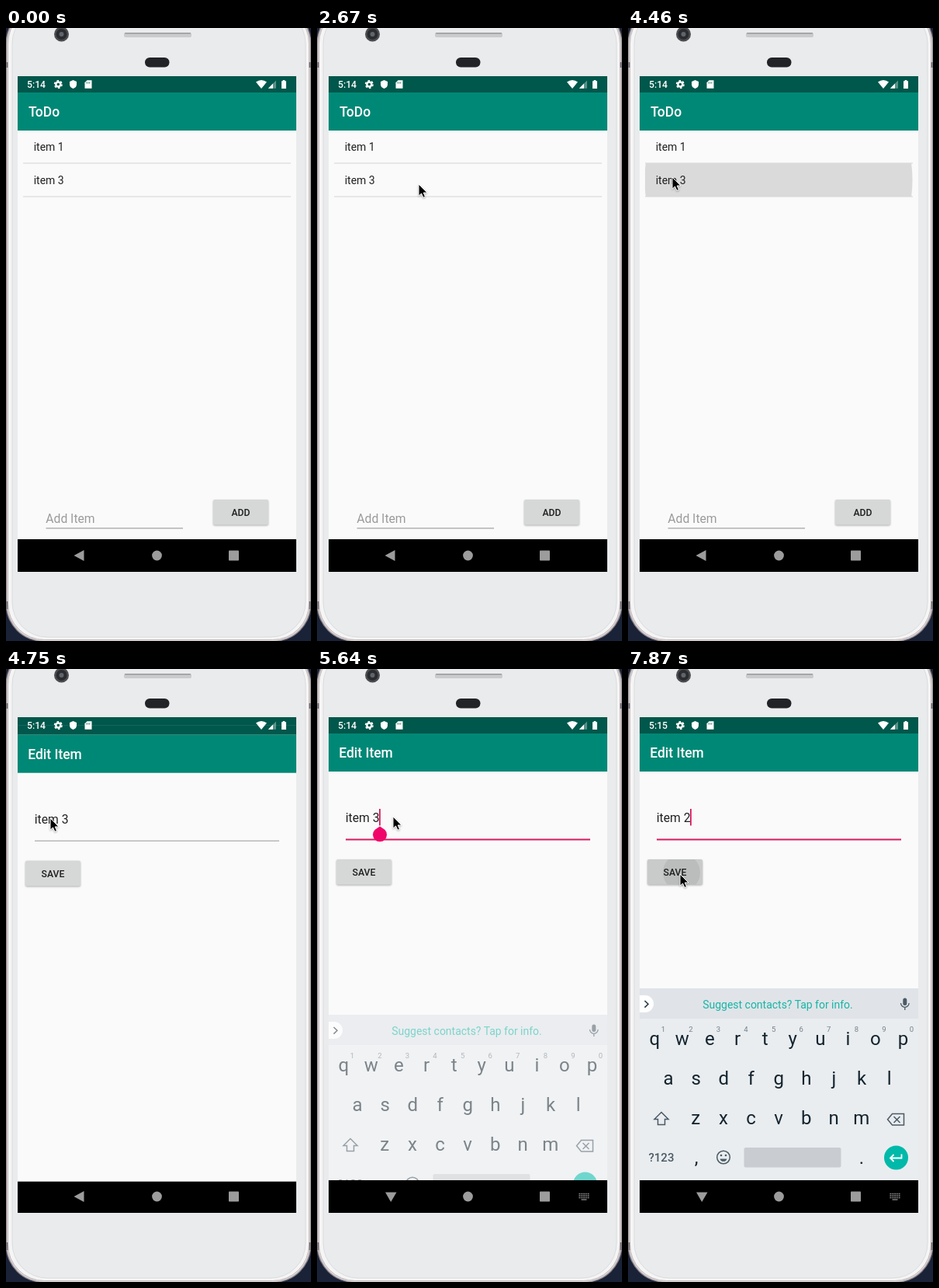
These frames come from a looping animation (393 px wide and 789 px high, 8 s). An HTML page:

```html
<!DOCTYPE html>
<html lang="en">
<head>
<meta charset="utf-8">
<title>ToDo</title>
<style>
  html, body { margin: 0; width: 100%; height: 100%; overflow: hidden; background: #1a2238; }
  svg { display: block; width: 100vw; height: 100vh; }
  text { font-family: Roboto, sans-serif; white-space: pre; }
  .title { font-size: 17.46px; font-weight: 500; fill: #fff; }
  .item { font-size: 13.97px; fill: #212121; }
  .field { font-size: 15.7px; fill: #212121; }
  .label { font-size: 12.2px; font-weight: 500; fill: #1f1f1f; text-anchor: middle; }
  .key { font-size: 24px; fill: #14242e; text-anchor: middle; }
  .num { font-size: 9.5px; fill: #75818a; text-anchor: middle; }
  .line { fill: none; stroke: #4b5a64; stroke-width: 1.5; }
  .shadow { filter: drop-shadow(0 1px 1px rgba(0,0,0,.3)); }
</style>
</head>
<body>
<svg viewBox="0 0 393 789" preserveAspectRatio="none">
  <defs>
    <clipPath id="screenClip"><rect x="15" y="62" width="359" height="638"/></clipPath>
    <clipPath id="rowClip"><rect x="22" y="174" width="345" height="43"/></clipPath>
    <clipPath id="revealClip"><rect id="reveal" x="15" y="62" width="359" height="638"/></clipPath>
    <clipPath id="keysClip"><rect x="15" y="132" width="359" height="526"/></clipPath>
    <clipPath id="saveClip"><rect x="25" y="245" width="71" height="32.5" rx="2"/></clipPath>
  </defs>

  <g id="phone">
    <rect x="-.5" y="-29" width="394" height="819" rx="49" fill="#8f888c"/>
    <rect x="1" y="-28" width="391" height="817" rx="48" fill="#ddd5d7"/>
    <rect x="2.5" y="-27" width="388" height="814.5" rx="47" fill="#f6f5f5" stroke="#b4acaf" stroke-width=".8"/>
    <rect x="8" y="-25" width="378" height="809" rx="45" fill="#e9ebec" stroke="#d5d6d8" stroke-width=".8"/>
    <path d="M0 44h2.5v7H0zM390.500 44h2.500v7h-2.500zM0 738h2.500v10H0zM390.500 738h2.500v10h-2.500z" fill="#77727a"/>
    <rect x="152" y="6" width="87" height="6" rx="2" fill="#c9cbcd"/>
    <rect x="153" y="6" width="85" height="1.500" rx=".7" fill="#97999c"/>
    <circle cx="71.500" cy="8" r="9.500" fill="#4b4d50"/>
    <circle cx="71.500" cy="8" r="7" fill="#2a2c30"/>
    <circle cx="71.500" cy="8" r="3" fill="#60656c"/>
    <rect x="179" y="38" width="31.500" height="12.500" rx="6.200" fill="#222326"/>
  </g>

  <g clip-path="url(#screenClip)">
    <rect x="15" y="62" width="359" height="638" fill="#fafafa"/>
    <rect x="15" y="62" width="359" height="21" fill="#00574b"/>
    <g id="list">
      <rect x="15" y="83" width="359" height="49" fill="#008876"/>
      <text class="title" x="29" y="114">ToDo</text>
      <path d="M22 174H367M22 217H367" stroke="#e1e1e1" stroke-width="1.600"/>
      <g clip-path="url(#rowClip)"><circle id="rowRipple" cy="195.500"/></g>
      <text class="item" x="35.700" y="158">item 1</text>
      <text class="item" x="35.700" y="201">item 3</text>
      <text class="field" x="51.300" y="637" style="fill:#9b9b9b">Add Item</text>
      <path d="M51.500 643.800H228" stroke="#a3a3a3" stroke-width="1.300"/>
      <rect class="shadow" x="267" y="607" width="71" height="32.500" rx="2" fill="#d6d7d7"/>
      <text class="label" x="302.500" y="628">ADD</text>
    </g>
    <rect x="15" y="658" width="359" height="42" fill="#000"/>

    <g id="edit" clip-path="url(#revealClip)">
      <g id="editBody">
        <rect x="15" y="62" width="359" height="596" fill="#fafafa"/>
        <rect x="15" y="62" width="359" height="21" fill="#00574b"/>
        <rect x="15" y="83" width="359" height="49" fill="#008876"/>
        <text class="title" x="28.300" y="114">Edit Item</text>
        <text id="entry" class="field" x="36.800" y="197"></text>
        <path id="underline" d="M37 219.500H352"/>
        <rect id="caret" x="80" y="180" width="1.800" height="21.500" fill="#d81b60"/>
        <path id="handle" d="M81 202.500L87.500 207A9 9 0 1 1 74.500 207Z" fill="#f0066a"/>
        <rect class="shadow" id="save" x="25" y="245" width="71" height="32.500" rx="2"/>
        <g clip-path="url(#saveClip)"><circle id="saveRipple" cx="69" cy="262" fill="#bbbdbd"/></g>
        <text class="label" x="60.500" y="266">SAVE</text>
      </g>
      <rect id="seam" x="15" width="359" height="1" fill="#1c6d62"/>
    </g>

    <g clip-path="url(#keysClip)"><g id="keyboard">
      <rect x="15" y="411" width="359" height="287" fill="#e9edf0"/>
      <rect x="15" y="411" width="359" height="39" fill="#e0e4e8"/>
      <path d="M15 420h7a11 11 0 0 1 0 22h-7z" fill="#fff"/>
      <path d="M21.500 427l4.500 4.300l-4.500 4.300" class="line" style="stroke:#25343d"/>
      <text x="193" y="437" text-anchor="middle" font-size="13.970" fill="#17b5a6">Suggest contacts? Tap for info.</text>
      <rect x="354.300" y="423.500" width="5" height="9.500" rx="2.500" fill="#4b5a64"/>
      <path class="line" d="M351.500 430a5.300 5.300 0 0 0 10.600 0M356.800 435.500v3.500" style="stroke-width:1.300"/>
      <g id="keys"></g>
      <path class="line" d="M43 570.500l9 9h-4.500v7h-9v-7H34z"/>
      <path class="line" d="M340.500 572.500H355.500V587H340.500L334.500 579.800ZM342.500 576l8 8m0-8l-8 8"/>
      <text x="43" y="634" text-anchor="middle" font-size="15" font-weight="500" fill="#4b5a64">?123</text>
      <circle class="line" cx="123" cy="628.500" r="8.300"/>
      <path class="line" d="M118.500 630.500a4.700 4.700 0 0 0 9 0z" style="fill:#4b5a64;stroke:none"/>
      <circle cx="120" cy="626" r="1.300" fill="#4b5a64"/>
      <circle cx="126" cy="626" r="1.300" fill="#4b5a64"/>
      <rect x="149.500" y="616" width="125" height="25.500" rx="2" fill="#c9cdd1"/>
      <circle cx="345.500" cy="629" r="15.500" fill="#00b9a9"/>
      <path class="line" d="M352.500 624.500v5h-14m4-4.500l-4.500 4.500l4.500 4.500" style="stroke:#fff;stroke-width:1.800"/>
    </g></g>

    <g id="status" fill="#fff">
      <text id="clock" x="27" y="77" font-size="12.200" font-weight="500"></text>
      <circle cx="67.300" cy="72.500" r="3" fill="none" stroke="#fff" stroke-width="2.400"/>
      <circle cx="67.300" cy="72.500" r="4.700" fill="none" stroke="#fff" stroke-width="1.700" stroke-dasharray="2.600 2.322"/>
      <path d="M86.500 67l4.500 2v3.500q0 4-4.500 5.500q-4.500-1.500-4.500-5.500V69z"/>
      <path d="M104.500 67.300h6v10.400h-9v-7.400z"/>
      <path d="M103.800 69.500v2m2-2v2m2-2v2" stroke="#00574b" stroke-width=".8"/>
      <path d="M322 69.500q7-5 14 0l-7 8.500z"/>
      <path d="M348 67.500v10.200h-10.200z" opacity=".35"/>
      <path d="M344 71.500v6.200h-6.200z"/>
      <path d="M355 68.300h1.700v-1.300h2.600v1.300H361v9.700h-6z"/>
    </g>
    <g id="nav" fill="#9c9c9c">
      <path id="back"/>
      <circle cx="194.500" cy="679" r="6.400"/>
      <rect x="287" y="672.500" width="13" height="13" rx=".8"/>
      <g id="switcher" fill="none" stroke="#9c9c9c">
        <path d="M337.500 675.500h13M337.500 678h13M337.500 680.500h13" stroke-width="1.300" stroke-dasharray="1.400 .92"/>
        <path d="M340.500 683h7" stroke-width="1.200"/>
      </g>
    </g>
  </g>

  <path id="pointer" class="shadow" d="M0 0V15.200L3.500 12L5.900 17.300L8.500 16.200L6.200 11H11Z" fill="#000" stroke="#fff" stroke-width="1"/>
</svg>

<script>
const LOOP = 8000;
const el = id => document.getElementById(id);
const set = (id, attrs) => {
  for (const name in attrs) el(id).setAttribute(name, attrs[name]);
};
const show = (id, on) => set(id, { visibility: on ? 'visible' : 'hidden' });

// Latest row [time, ...values] that has started.
const at = (track, t) => track.filter(row => row[0] <= t).pop();

const pointer = [
  [0, 420, 690], [1190, 383, 677], [1340, 310, 671],
  [1630, 293, 588], [1780, 208, 464], [1930, 196, 429],
  [2230, 182, 291], [2380, 140, 222], [2520, 133, 207], [2670, 131, 201],
  [3870, 78, 196], [4020, 57, 192], [5050, 76, 194], [5200, 98, 190],
  [7130, 94, 203], [7280, 80, 236], [7430, 69, 260], [7580, 67, 264]
];
// time, centre x, radius, colour
const rowPress = [[0, 0, 0, 'none'], [4310, 115, 85, '#e4e4e4'], [4460, 194, 172.5, '#dadada']];
// time, content shift, top of the revealed area
const opening = [[0, 0, 700], [4600, 15, 300], [4750, 1.7, 72], [4900, 0, 62]];
// time, shift, opacity
const keyboard = [[0, 0, 0], [5640, 34, .55], [5790, 4, 1], [5940, 0, 1]];
const entry = [[0, 'item 3', 80], [6390, 'item ', 71.3], [6830, 'item 2', 80]];
const handle = [[0, 0], [5490, .7], [5640, 1], [6540, 0]];
const savePress = [[0, 0, '#d6d7d7'], [7720, 13, '#cfd0d0'], [7870, 24, '#c9caca']];

function buildKeys() {
  const key = (cls, x, y, ch) => `<text class="${cls}" x="${x}" y="${y}">${ch}</text>`;
  const row = (letters, x, y) =>
    [...letters].map((ch, i) => key('key', x + i * 35.58, y, ch)).join('');
  el('keys').innerHTML =
    row('qwertyuiop', 34.3, 484) + row('asdfghjkl', 52, 535) + row('zxcvbnm', 87.300, 586) +
    [...'1234567890'].map((ch, i) => key('num', 45.3 + i * 35.58, 466.5, ch)).join('') +
    key('key', 88, 637, ',') + key('key', 301, 637, '.');
}

function render(t) {
  const [, px, py] = at(pointer, t);
  set('pointer', { transform: `translate(${px} ${py})` });

  const [, cx, r, fill] = at(rowPress, t);
  set('rowRipple', { cx, r, fill });

  const [, shift, top] = at(opening, t);
  show('edit', t >= 4600);
  set('reveal', { y: top });
  set('editBody', { transform: `translate(0 ${shift})` });
  set('seam', { y: top - .3, opacity: top > 62 && top < 83 ? 1 : 0 });

  const [, text, caretX] = at(entry, t);
  el('entry').textContent = text;
  set('caret', { x: caretX, opacity: t >= 5490 ? 1 : 0 });
  set('handle', { opacity: at(handle, t)[1] });
  const focused = t >= 5350;
  set('underline', { stroke: focused ? '#d81b60' : '#999', 'stroke-width': focused ? 1.8 : 1 });

  const [, saveR, saveFill] = at(savePress, t);
  set('save', { fill: saveFill });
  set('saveRipple', { r: saveR });

  const [, drop, opacity] = at(keyboard, t);
  set('keyboard', { transform: `translate(0 ${drop})`, opacity });
  const typing = t >= 5640;
  set('back', { d: typing ? 'M88 673.5H102.500L95.200 686Z' : 'M87.500 679L100.500 672V686Z' });
  show('switcher', typing);
  el('clock').textContent = t >= 7430 ? '5:15' : '5:14';
}

buildKeys();
const start = performance.now();
function tick() {
  render((performance.now() - start) % LOOP);
  requestAnimationFrame(tick);
}
tick();
</script>
</body>
</html>
```
